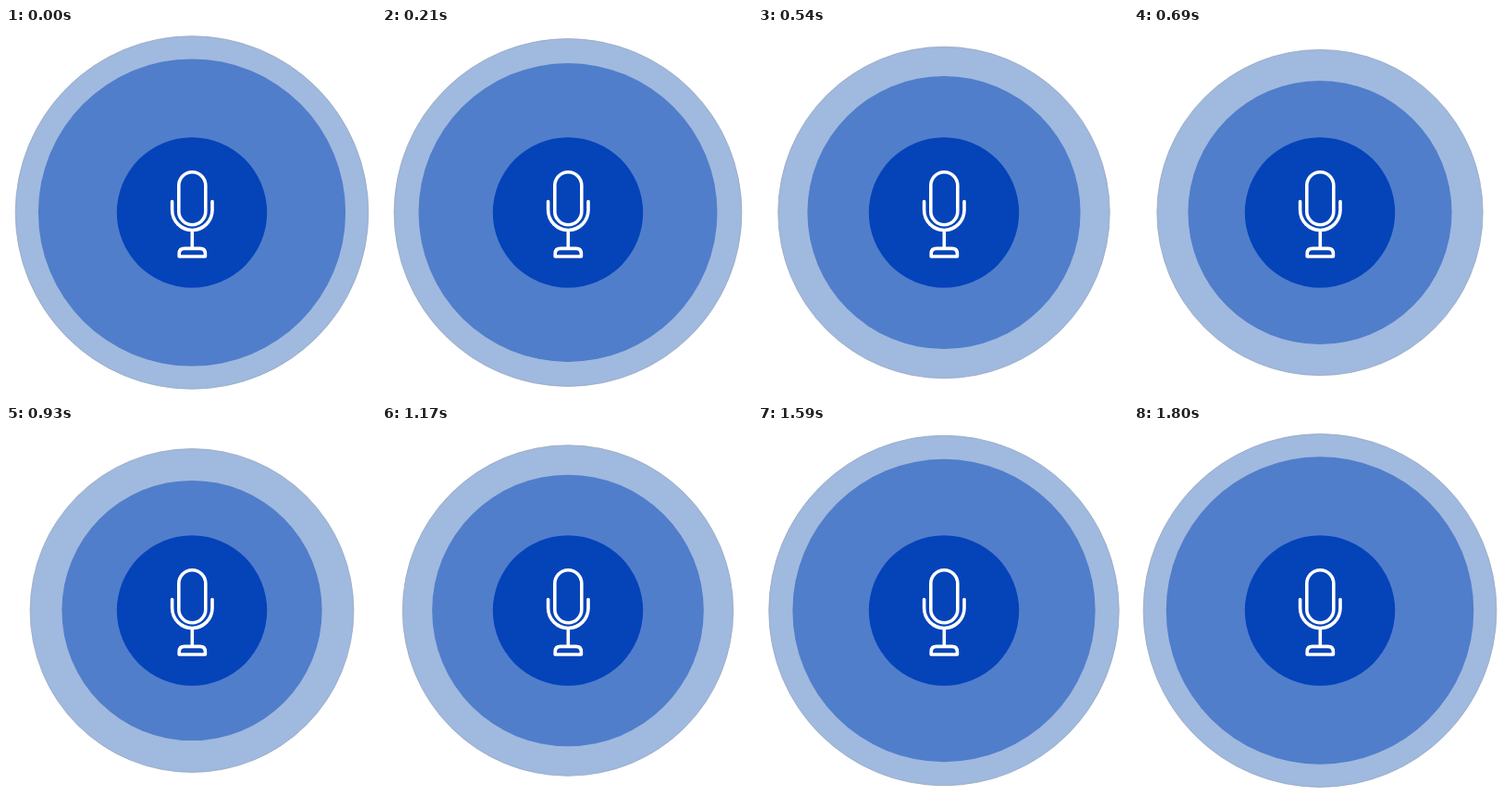
An HTML page for the animation above (1.83 s loop, 400 by 400 pixels).

```html
<!DOCTYPE html>
<html lang="en">
<head>
<meta charset="utf-8">
<title>Voice pulse</title>
<style>
  html, body { margin: 0; width: 100%; height: 100%; overflow: hidden; background: #fff; }
  svg { display: block; width: 100%; height: 100%; }
</style>
</head>
<body>
<svg viewBox="0 0 400 400">
  <g transform="translate(201 199.5)">
    <circle id="halo" fill="#a0b9de" stroke="#98a8c0" stroke-width="0.8"/>
    <circle id="ring" fill="#507ecb"/>
    <circle r="81.2" fill="#0543b9"/>
  </g>
  <g fill="none" stroke="#fff" stroke-width="3.6" stroke-linecap="round" stroke-linejoin="round">
    <rect x="186.8" y="155.8" width="29" height="57" rx="14.5"/>
    <path d="M179.6 187.6V196.8A21.7 21.7 0 0 0 223 196.8V187.6"/>
    <path d="M201.3 219V237"/>
    <path d="M187.2 247V244Q187.2 238.4 192.8 238.4H209.8Q215.4 238.4 215.4 244V247Z"/>
  </g>
</svg>
<script>
  const LOOP = 1830, STEP = 30, SMALLEST_AT = 865;
  const halo = document.getElementById('halo');
  const ring = document.getElementById('ring');

  function draw(ms) {
    const t = Math.floor((ms % LOOP) / STEP) * STEP;
    const swell = -Math.cos((t - SMALLEST_AT) / LOOP * 2 * Math.PI);
    halo.setAttribute('r', 182.8 + 8.1 * swell);
    ring.setAttribute('r', 153.3 + 13 * swell);
  }

  const start = performance.now();
  function tick() {
    draw(performance.now() - start);
    requestAnimationFrame(tick);
  }
  tick();
</script>
</body>
</html>
```
